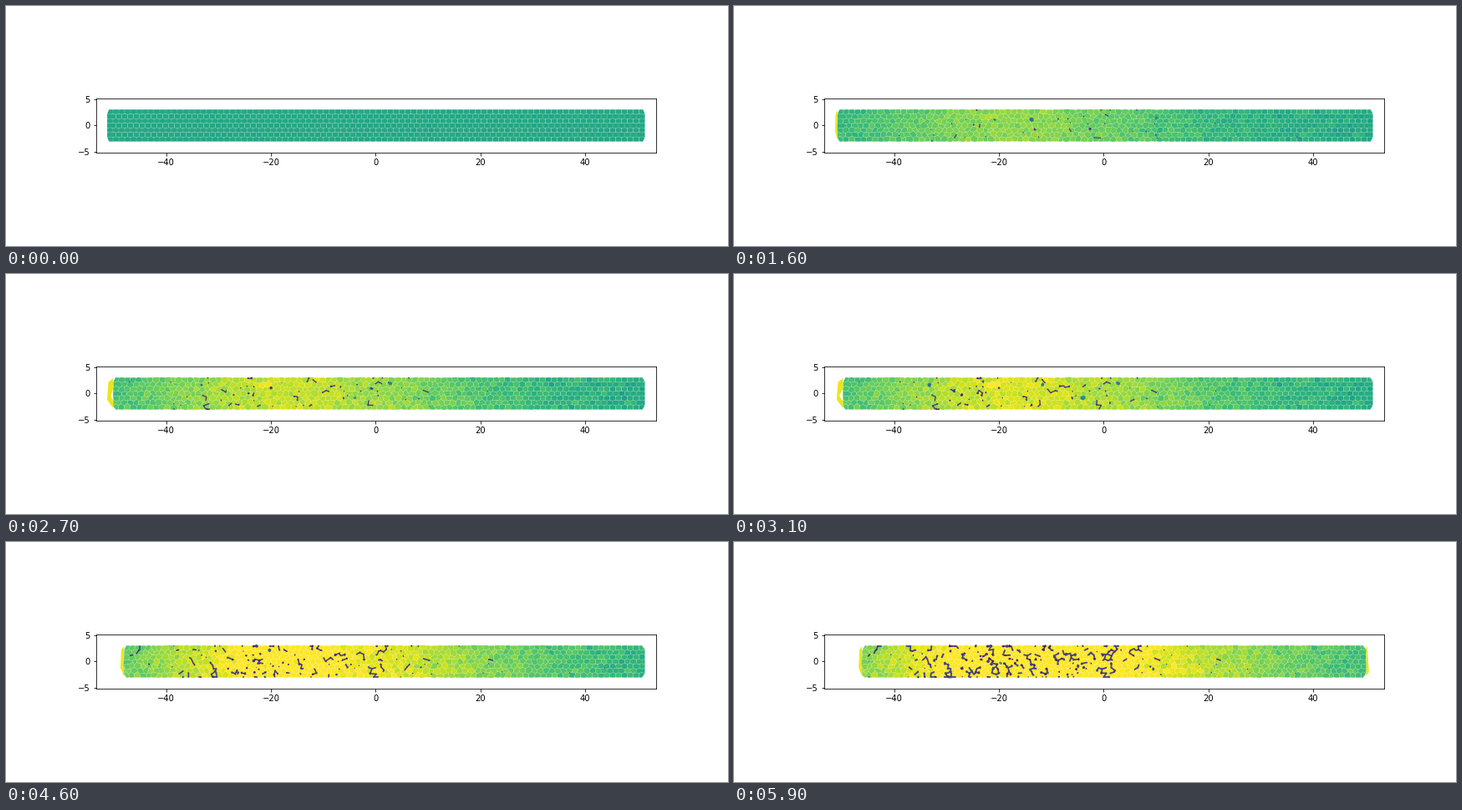
Recreate the animation shown at these times as a matplotlib script. Size 864 by 288 pixels, loop 6 s.

```python
import numpy as np
import matplotlib.pyplot as plt
from matplotlib.animation import FuncAnimation
from matplotlib.collections import LineCollection, PolyCollection

FRAMES = 60
WIDTH, HEIGHT = 864, 288
SCALE = 6.27            # pixels per data unit
ROWS, COLS = 7, 92
LEFT, RIGHT = -51.24, 51.4
HALF = 3.07             # half the height of the tissue

rng = np.random.default_rng(12)
cmap = plt.get_cmap("viridis")


def progress(t):
    return t / (FRAMES - 1)


def field(x, t):
    """Colour level: a hump that rises and spreads to the right."""
    u = progress(t)
    d = x + 18
    spread = np.where(d < 0, 29.5, 29 + 23 * u)
    return .6 + .5 * u ** .64 * np.exp(-(d / spread) ** 2)


def blobs(n, corners=6):
    """Small irregular unit polygons."""
    angle = np.linspace(0, 2 * np.pi, corners, endpoint=False)
    angle = angle + rng.uniform(0, 2 * np.pi, (n, 1))
    radius = rng.uniform(.5, 1.2, (n, corners))
    return np.stack([radius * np.cos(angle), radius * np.sin(angle)], axis=-1)


# Vertex lattice: row borders times half cell widths
NX = 2 * COLS + 1
shape = (ROWS + 1, NX)
s, border = np.meshgrid(np.linspace(0, 1, NX), np.arange(ROWS + 1))
rest_y = HALF * (2 * border / ROWS - 1)
zig = np.where((border + np.arange(NX)) % 2 == 0, 1.0, -1.0)
zig[[0, -1]] *= .2
loose_x = np.ones(shape)
loose_x[:, [0, -1]] = .3
loose_y = np.ones(shape)
loose_y[[0, -1]] = .2

jitter = rng.uniform(-1, 1, (2,) + shape)
phase = rng.uniform(0, 2 * np.pi, (3,) + shape)

# Correlated opening thresholds, so that gaps form chains
rough = rng.random(shape)
rough = rough + .7 * (np.roll(rough, 1, 1) + np.roll(rough, 1, 0))
threshold = (rough.ravel().argsort().argsort() / rough.size).reshape(shape)
gap_shape = blobs(rough.size).reshape(shape + (6, 2))
gap_tone = rng.random(shape)

# Larger gaps that come and go
SPOTS = 45
spot_time = FRAMES * rng.uniform(.1, 1.05, SPOTS)
spot_centre = np.stack([rng.normal(-14, 17, SPOTS),
                        rng.uniform(-2.4, 2.4, SPOTS)], axis=-1)
spot_level = .08 + .45 * rng.random(SPOTS) ** 2
spot_shape = blobs(SPOTS)


def cell_spans(row):
    if row % 2 == 0:
        cuts = list(range(0, NX, 2))
    else:
        cuts = [0] + list(range(3, NX - 2, 2)) + [NX - 1]
    return list(zip(cuts[:-1], cuts[1:]))


cells = [(r, a, b) for r in range(ROWS) for a, b in cell_spans(r)]
cell_noise = rng.normal(0, 1, len(cells))

sides = [((r, i), (r, i + 1)) for r in range(ROWS + 1) for i in range(NX - 1)]
sides += [((r, b), (r + 1, b)) for r in range(ROWS) for _, b in cell_spans(r)]
side_a = tuple(np.array([e[0] for e in sides]).T)
side_b = tuple(np.array([e[1] for e in sides]).T)


def ends(t):
    """Both ends of the tissue, and the tips of the strips beyond them."""
    left = LEFT + 5.1 * progress(t) ** 1.9
    left_tip = min(left, LEFT + .15 * max(0, t - 29))
    pull = np.clip((t - 50) / 7, 0, 1)
    return left, left_tip, RIGHT - 1.3 * pull, RIGHT - .75 * pull


def vertices(t):
    left, _, right, _ = ends(t)
    x = LEFT + (RIGHT - LEFT) * s
    x = x + (left - LEFT) * (1 - s) ** 2 + (right - RIGHT) * s ** 8
    stir = np.clip((field(x, t) - .6) * 1.3, 0, .23)
    sway = .35 * np.sin(.2 * t + phase[:2])
    y = rest_y + zig * (.05 + .5 * stir) + stir * loose_y * (jitter[1] + sway[1])
    x = x + stir * loose_x * (jitter[0] + sway[0])
    inset = .35 + .25 * progress(t)
    x[[0, -1], 0] += inset
    x[[0, -1], -1] -= inset
    return x, y


def cell_polygons(pts):
    return [np.vstack([pts[r, a:b + 1], pts[r + 1, a:b + 1][::-1]])
            for r, a, b in cells]


def gap_chance(x, t):
    d = x + 22
    spread = np.where(d < 0, 14, 29)
    return .45 * progress(t) ** 1.5 * np.exp(-(d / spread) ** 2)


def gaps(pts, t):
    now = threshold * (1 + .3 * np.sin(.22 * t + phase[2]))
    excess = gap_chance(pts[..., 0], t) - now
    is_open = excess > 0
    size = (.14 + .18 * np.clip(excess * 3.5, 0, 1))[is_open]
    # Keep gaps inside the outline
    inner = np.clip(pts, [LEFT, .12 - HALF], [RIGHT, HALF - .12])
    polys = inner[is_open][:, None] + size[:, None, None] * gap_shape[is_open]
    both = is_open[side_a] & is_open[side_b]
    chains = np.stack([inner[side_a][both], inner[side_b][both]], axis=1)
    level = .05 + (.08 + .15 * progress(t)) * gap_tone[is_open]
    return polys, level, chains


def spots(t):
    size = np.clip(1.4 - np.abs(t - spot_time) / 5, 0, 1) * (.25 + .5 * spot_level)
    seen = size > 0
    polys = spot_centre[seen][:, None] + size[seen, None, None] * spot_shape[seen]
    return polys, spot_level[seen]


def end_strips(t):
    left, left_tip, right, right_tip = ends(t)
    dl, dr = left - left_tip, right_tip - right
    hole = .6 * dl * max(0, 1 - abs(t - 31) / 10)
    return [
        [(left, 2.9), (left - .8 * dl, 2.2), (left - dl, -1.2), (left, -2.8)],
        [(right, 2.9), (right + .4 * dr, 2.7), (right + dr, -2), (right, -2.8)],
        [(left, .9), (left - hole, -.4), (left, -1.5)],
    ]


fig = plt.figure(figsize=(WIDTH / 72, HEIGHT / 72), dpi=72, facecolor="white")
ax = fig.add_axes([.125, 111.8 / HEIGHT, .775, 65 / HEIGHT],
                  xlim=(-53.32, 53.48), ylim=(-5.23, 5.14))
ax.set_xticks(range(-40, 41, 20))
ax.set_yticks([-5, 0, 5])

strip_art = PolyCollection([], facecolors=[cmap(.97), cmap(.97), "white"],
                           edgecolors="none", zorder=1)
cell_art = PolyCollection([], edgecolors=(1, 1, 1, .2), linewidths=.5,
                          cmap=cmap, clim=(0, 1), zorder=2)
chain_art = LineCollection([], colors=[cmap(.17)], zorder=3)
gap_art = PolyCollection([], edgecolors="none", cmap=cmap, clim=(0, 1), zorder=4)
for art in (strip_art, cell_art, chain_art, gap_art):
    ax.add_collection(art, autolim=False)


def draw(t):
    pts = np.stack(vertices(t), axis=-1)
    polys = cell_polygons(pts)
    middle = np.array([p[:, 0].mean() for p in polys])
    cell_art.set_verts(polys)
    cell_art.set_array(field(middle, t)
                       + cell_noise * (.005 + .022 * min(1, t / 20)))
    strip_art.set_verts(end_strips(t))

    gap_polys, gap_levels, chains = gaps(pts, t)
    spot_polys, spot_levels = spots(t)
    gap_art.set_verts(list(gap_polys) + list(spot_polys))
    gap_art.set_array(np.concatenate([gap_levels, spot_levels]))
    chain_art.set_segments(list(chains))
    chain_art.set_linewidth(1 + .7 * progress(t))
    return strip_art, cell_art, chain_art, gap_art


anim = FuncAnimation(fig, draw, frames=FRAMES, interval=100, repeat=True,
                     repeat_delay=0)
plt.show()
```
